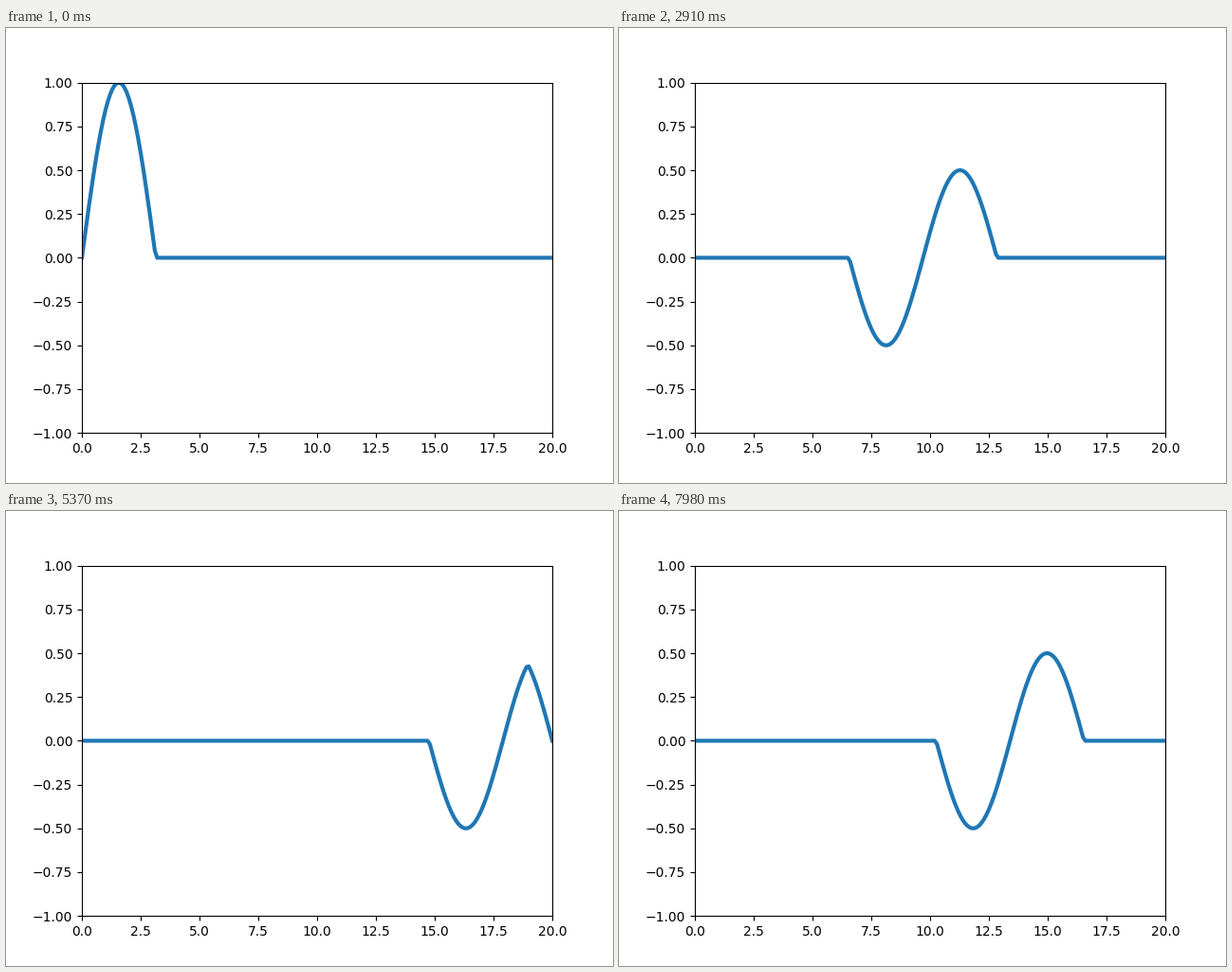
A matplotlib script for the animation above (8000 ms loop, 640 by 480 pixels).

```python
import numpy as np
import matplotlib.pyplot as plt
from matplotlib.animation import FuncAnimation

LENGTH = 20.0
CELLS = 200
FRAMES = 267
LOOP_MS = 8000

x = np.linspace(0, LENGTH, CELLS + 1)
pulse = np.where(x < np.pi, np.sin(x), 0.0)

# Odd periodic extension keeps both ends of the string fixed at zero.
wave = np.concatenate([pulse, -pulse[-2:0:-1]])


def displacement(step):
    """Half of the pulse travels right, half left, one cell per step."""
    u = 0.5 * (np.roll(wave, step) + np.roll(wave, -step))
    return u[:CELLS + 1]


fig, ax = plt.subplots(figsize=(6.4, 4.8), dpi=100)
ax.set_xlim(0, LENGTH)
ax.set_ylim(-1, 1)
line, = ax.plot(x, displacement(0), lw=3, color="#1f77b4")


def init():
    line.set_ydata(displacement(0))
    return line,


def update(step):
    line.set_ydata(displacement(step))
    return line,


anim = FuncAnimation(fig, update, frames=FRAMES, init_func=init,
                     interval=LOOP_MS / FRAMES, repeat=True, repeat_delay=0)
plt.show()
```
